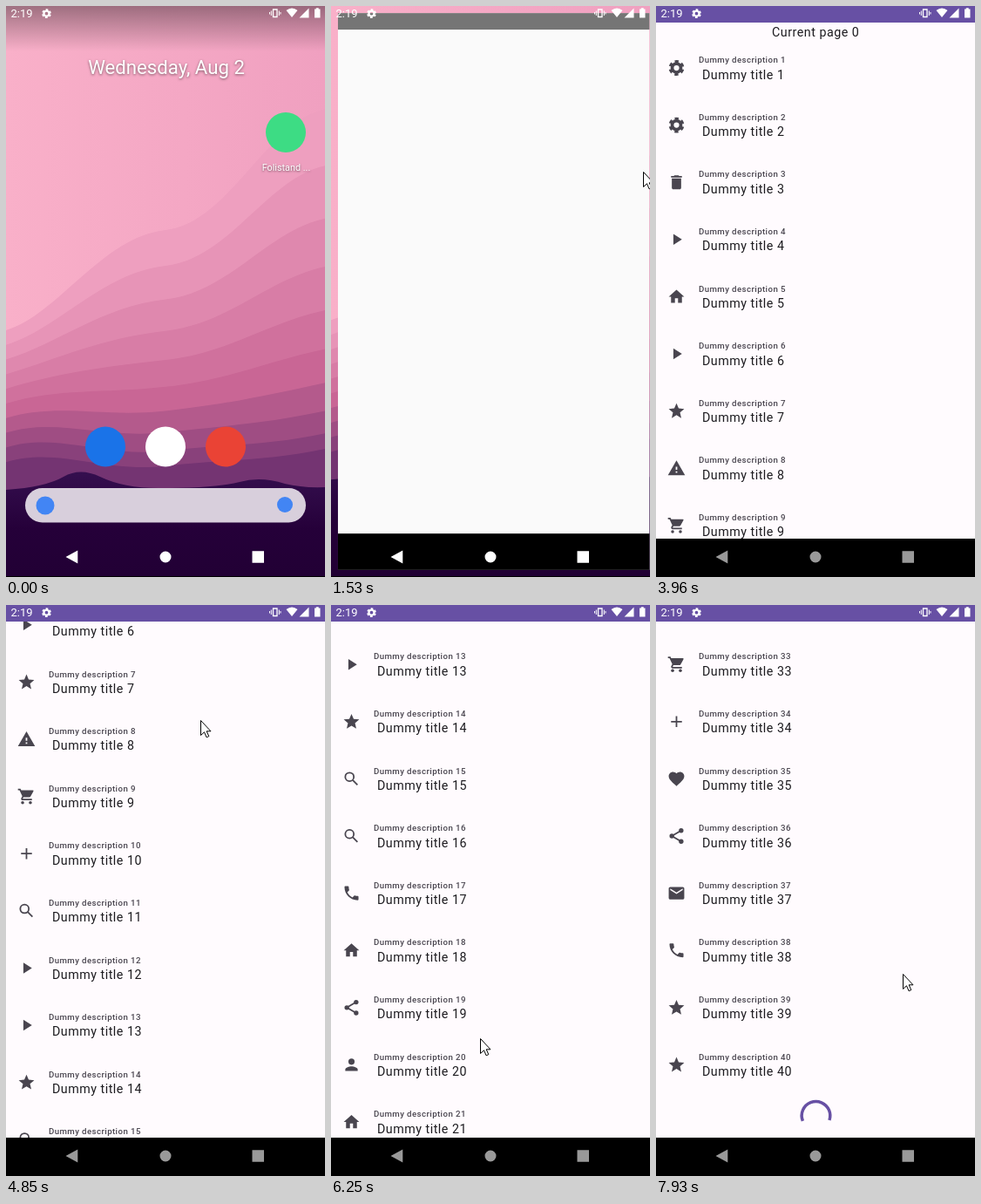
Recreate the animation shown at these times as an HTML page. Size 366x655 px, loop 8 s.

```html
<!DOCTYPE html>
<html lang="en">
<head>
<meta charset="utf-8">
<title>Paged list</title>
<style>
  html, body { margin: 0; width: 100%; height: 100%; overflow: hidden; background: #000; }
  svg { display: block; width: 366px; height: 655px; }
  text { font-family: Roboto, sans-serif; }
  .date { font-size: 22.2px; fill: #fff; text-anchor: middle; filter: drop-shadow(0 1px 1.5px rgba(0,0,0,.5)); }
  .label { font-size: 10.8px; fill: #fff; text-anchor: middle; filter: drop-shadow(0 1px 1px rgba(0,0,0,.5)); }
  .clock { font-size: 13px; fill: #fff; }
  .title { font-size: 14.25px; letter-spacing: .51px; fill: #1c1b1f; }
  .desc { font-size: 9.7px; font-weight: 500; letter-spacing: .4px; fill: #49454f; }
  .icon { fill: #49454f; color: #49454f; fill-rule: evenodd; }
</style>
</head>
<body>
<svg viewBox="0 0 366 655">
  <defs>
    <linearGradient id="shade" x2="0" y2="1">
      <stop offset="0" stop-opacity=".36"/><stop offset="1" stop-opacity="0"/>
    </linearGradient>
    <linearGradient id="sky">
      <stop offset="0" stop-color="#f9b0c9"/><stop offset="1" stop-color="#f0a0c0"/>
    </linearGradient>
    <linearGradient id="ground" x2="0" y2="1">
      <stop offset="0" stop-color="#350f4f"/><stop offset=".4" stop-color="#250039"/><stop offset="1" stop-color="#1f0031"/>
    </linearGradient>
    <clipPath id="viewport"><rect y="19" width="366" height="592"/></clipPath>
    <g id="gear" fill="none" stroke="currentColor">
      <circle cx="12" cy="12" r="5.6" stroke-width="4.2"/>
      <circle cx="12" cy="12" r="8" stroke-width="4" stroke-dasharray="4.6 3.778" transform="rotate(13.5 12 12)"/>
    </g>
  </defs>

  <g id="home">
    <g id="wallpaper">
      <rect width="366" height="700" fill="url(#sky)"/>
      <g id="bands"></g>
      <path d="M0 555Q45 552 66 540Q85 529 108 540Q135 553 175 553Q240 553 268 546Q292 539 320 548Q340 553 366 552V700H0z" fill="url(#ground)"/>
    </g>
    <g id="launcher">
      <rect width="366" height="52" fill="url(#shade)"/>
      <text class="date" x="184" y="78">Wednesday, Aug 2</text>
      <circle cx="321" cy="145" r="23" fill="#3ddc84"/>
      <text class="label" x="321.5" y="189">Folistand ...</text>
      <circle cx="114" cy="505.5" r="23" fill="#1a73e8"/>
      <circle cx="183" cy="505.5" r="23" fill="#fff"/>
      <circle cx="252" cy="505.5" r="23" fill="#ea4335"/>
      <rect x="22" y="553" width="322" height="39.5" rx="19.7" fill="#d8cfdc"/>
      <circle cx="45" cy="573" r="10.5" fill="#4285f4"/>
      <circle cx="320" cy="572" r="9" fill="#4285f4"/>
    </g>
  </g>

  <g id="splash">
    <rect id="card" fill="#fafafa"/>
    <rect id="cardTop" fill="#757575"/>
    <rect id="cardNav"/>
  </g>

  <g id="app">
    <rect width="366" height="655"/>
    <rect width="366" height="611" fill="#fffbfe"/>
    <g clip-path="url(#viewport)">
      <g id="list">
        <text class="title" x="183.2" y="34.7" text-anchor="middle">Current page 0</text>
        <g id="rows"></g>
        <circle id="spinner" r="16.3" fill="none" stroke="#6750a4" stroke-width="3.5" pathLength="360"/>
      </g>
    </g>
    <rect width="366" height="19" fill="#6750a4"/>
  </g>

  <rect y="654" width="366" height="1"/>
  <g fill="#fff" color="#fff">
    <text class="clock" x="5.5" y="13.3">2:19</text>
    <use href="#gear" transform="translate(40 2.2) scale(.54)"/>
    <path d="M306.5 4h4.5v8.5h-4.5z" fill="none" stroke="#fff" stroke-width="1.3"/>
    <path d="M304.3 5.5v5.5M302.5 7v2.500M313.3 5.5v5.5M315 7v2.5" stroke="#fff"/>
    <path d="M321.5 5Q328 0 334.500 5L328 13zM336.5 13.500h11v-11zM354 3.500h1.800v-1.300h2.900v1.300h1.800v10h-6.500z"/>
  </g>
  <path id="nav" d="M82.300 624.600v14.800l-13.800-7.400zM176.500 632a6.500 6.500 0 1 0 13 0a6.500 6.500 0 1 0-13 0M282.500 625.300h13.500v13.500h-13.500z"/>
  <path id="cursor" d="M.5 .5v17l4-3.700 2.600 6 2.700-1.200-2.600-5.800h4.800z" fill="#fff" stroke="#000"/>
</svg>

<script>
const $ = id => document.getElementById(id);
const LOOP = 8000, ROW = 65.6, PAGE = 20;
const path = d => `<path d="${d}"/>`;
const clamp = x => Math.min(1, Math.max(0, x));
const mix = (a, b, p) => a + (b - a) * p;
const smooth = x => x * x * (3 - 2 * x);

const ICONS = {
  gear: '<use href="#gear"/>',
  bin: path('M6 19c0 1.1.9 2 2 2h8c1.1 0 2-.9 2-2V7H6zM19 4h-3.5l-1-1h-5l-1 1H5v2h14z'),
  play: path('M8 5v14l11-7z'),
  house: path('M10 20v-6h4v6h5v-8h3L12 3 2 12h3v8z'),
  star: path('M12 17.27 18.18 21l-1.64-7.03L22 9.24l-7.19-.61L12 2 9.19 8.63 2 9.24l5.46 4.73L5.82 21z'),
  warn: path('M1 21h22L12 2zm12-3h-2v-2h2zm0-4h-2v-4h2z'),
  cart: path('M1 2v2h2l3.6 7.59-1.35 2.45c-.7 1.3.2 2.96 1.75 2.96h12v-2H7.42c-.2 0-.3-.2-.22-.37l.9-1.63h7.45c.75 0 1.41-.41 1.75-1.03l3.58-6.49A1 1 0 0 0 20 4H5.21l-.94-2z')
    + '<circle cx="7" cy="20" r="2"/><circle cx="17" cy="20" r="2"/>',
  plus: path('M19 13h-6v6h-2v-6H5v-2h6V5h2v6h6z'),
  find: '<g fill="none" stroke="currentColor" stroke-width="2"><circle cx="9.5" cy="9.5" r="5.5"/><path d="M13.6 13.6l6.1 6.1"/></g>',
  phone: path('M6.62 10.79c1.44 2.83 3.76 5.14 6.59 6.59l2.2-2.2c.27-.27.67-.36 1.02-.24 1.12.37 2.33.57 3.57.57.55 0 1 .45 1 1V20c0 .55-.45 1-1 1-9.39 0-17-7.61-17-17 0-.55.45-1 1-1h3.5c.55 0 1 .45 1 1 0 1.25.2 2.45.57 3.57.11.35.03.74-.25 1.02z'),
  share: '<path d="M18 5L6 12l12 7" fill="none" stroke="currentColor" stroke-width="2"/><circle cx="18" cy="5" r="3"/><circle cx="6" cy="12" r="3"/><circle cx="18" cy="19" r="3"/>',
  user: '<circle cx="12" cy="8" r="4"/>' + path('M12 14c-2.67 0-8 1.34-8 4v2h16v-2c0-2.66-5.33-4-8-4z'),
  heart: path('M12 21.35l-1.45-1.32C5.4 15.36 2 12.28 2 8.5 2 5.42 4.42 3 7.5 3c1.74 0 3.41.81 4.5 2.09C13.09 3.81 14.76 3 16.5 3 19.58 3 22 5.42 22 8.5c0 3.78-3.4 6.86-8.55 11.54z'),
  mail: path('M20 4H4c-1.1 0-2 .9-2 2v12c0 1.1.9 2 2 2h16c1.1 0 2-.9 2-2V6c0-1.1-.9-2-2-2zm0 4l-8 5-8-5V6l8 5 8-5z')
};
const ORDER = ('gear gear bin play house play star warn cart plus find play play star find find phone house share user '
  + 'house star mail plus phone find heart bin cart mail play warn cart plus heart share mail phone star star').split(' ');

$('rows').innerHTML = ORDER.map((name, i) => `<g transform="translate(0 ${i * ROW})">
  <g class="icon" transform="translate(12.8 60.3) scale(.892)">${ICONS[name]}</g>
  <text class="desc" x="49" y="65.3">Dummy description ${i + 1}</text>
  <text class="title" x="53" y="83.5">Dummy title ${i + 1}</text></g>`).join('');
const rows = [...$('rows').children];

// Wallpaper ridges flatten and darken towards the ground
function ridge(u) {
  const left = mix(372, 540, u), right = mix(118, 516, 1 - (1 - u) ** 1.7), mid = (left + right) / 2 + 12;
  const [from, to] = u < .5 ? ['#ee9fbf', '#c96695'] : ['#c96695', '#5f2869'];
  return `<path style="fill:color-mix(in srgb, ${to} ${u * 200 % 100}%, ${from})"
    d="M0 ${left}C60 ${left - 18} 110 ${mid + 8} 183 ${mid}S300 ${right + 14} 366 ${right}V700H0z"/>`;
}
$('bands').innerHTML = Array.from({ length: 10 }, (_, i) => ridge(i / 10)).join('') ;

// Pointer stops: time, x, y
const STOPS = [
  [480, 357, 184], [830, 319, 157], [1390, 319, 157], [1530, 358, 190],
  [4420, 232, 508], [4850, 223, 132], [6110, 171, 497], [6390, 171, 497],
  [6600, 235, 157], [6810, 259, 250], [7720, 283, 423]
];
function pointer(t) {
  const next = STOPS.findIndex(stop => stop[0] > t);
  if (next < 1) return STOPS.at(next).slice(1);
  const [t0, x0, y0] = STOPS[next - 1], [t1, x1, y1] = STOPS[next], p = smooth((t - t0) / (t1 - t0));
  return [mix(x0, x1, p), mix(y0, y1, p)];
}

// Each fling runs to the end of the loaded page
const FLINGS = [{ start: 4560, length: 599, by: 790 }, { start: 6380, length: 717, by: PAGE * ROW }];
const scrolled = t => FLINGS.reduce((sum, f) => sum + f.by * smooth(clamp((t - f.start) / f.length)), 0);
const spinStarts = [2580, ...FLINGS.map(f => f.start + f.length)];

// The screen refreshes every 70 ms
function tick(t) {
  const phase = t < 3960 ? 60 : 20;
  return phase + Math.floor((t - phase) / 70) * 70;
}

// cubic-bezier(.4, 0, .2, 1)
function ease(x) {
  x = clamp(x);
  let lo = 0, hi = 1, s = .5;
  for (let i = 0; i < 20; i++) {
    s = (lo + hi) / 2;
    const bx = 1.2 * s * (1 - s) ** 2 + .6 * s * s * (1 - s) + s ** 3;
    if (bx < x) lo = s; else hi = s;
  }
  return smooth(s);
}

function spin(elapsed, y) {
  const cycle = 1332, turn = Math.floor(elapsed / cycle), u = elapsed / cycle - turn;
  const head = 290 * ease(u * 2), tail = 290 * ease(u * 2 - 1);
  const angle = tail - 90 + 146 * turn + 286 * u, sweep = Math.max(.1, head - tail);
  $('spinner').setAttribute('transform', `translate(183.5 ${y}) rotate(${angle})`);
  $('spinner').setAttribute('stroke-dasharray', `${sweep} ${360 - sweep}`);
}

const show = (el, on) => el.style.display = on ? '' : 'none';
function box(id, x, y, width, height, rx = 0) {
  Object.entries({ x, y, width, height, rx }).forEach(([k, v]) => $(id).setAttribute(k, v));
}

// The window grows out of the launcher icon
function openWindow(p) {
  const w = mix(46, 366, p), h = mix(46, 655, p);
  const x = mix(321, 183, p) - w / 2, y = mix(145, 327.5, 1 - (1 - p) ** 4) - h / 2;
  const bars = p > .8 ? p * p : 0, nav = 44 * bars;
  box('card', x, y, w, h, bars ? 0 : 22);
  box('cardTop', x, y, w, 20 * bars);
  box('cardNav', x, y + h - nav, w, nav);
}

function draw(t) {
  const inApp = t >= 2580, opening = t >= 1250 && !inApp;
  show($('home'), !inApp);
  show($('splash'), opening);
  show($('app'), inApp);

  const open = 1 - (1 - clamp((t - 1250) / 350)) ** 2.25;
  $('launcher').style.opacity = 1 - clamp(open * 1.3);
  $('wallpaper').setAttribute('transform', `translate(0 ${-12 * open})`);
  if (opening) openWindow(open);

  if (inApp) {
    const pages = t < 3940 ? 0 : t < 6110 ? 1 : 2, count = pages * PAGE;
    rows.forEach((row, i) => show(row, i < count));
    $('list').setAttribute('transform', `translate(0 ${-scrolled(t)})`);
    const now = pages ? t : Math.min(t, 3700);
    spin(Math.max(0, now - spinStarts[pages]), 63.8 + count * ROW);
  }

  $('nav').setAttribute('fill', t < 2160 ? '#fff' : t < 2370 ? '#ddd' : t < 2580 ? '#bbb' : '#999');
  show($('cursor'), t >= 480 && t < 1600 || t >= 4420);
  $('cursor').setAttribute('transform', `translate(${pointer(t)})`);
}

const begin = performance.now();
function frame() {
  draw(tick((performance.now() - begin) % LOOP));
  requestAnimationFrame(frame);
}
frame();
</script>
</body>
</html>
```
